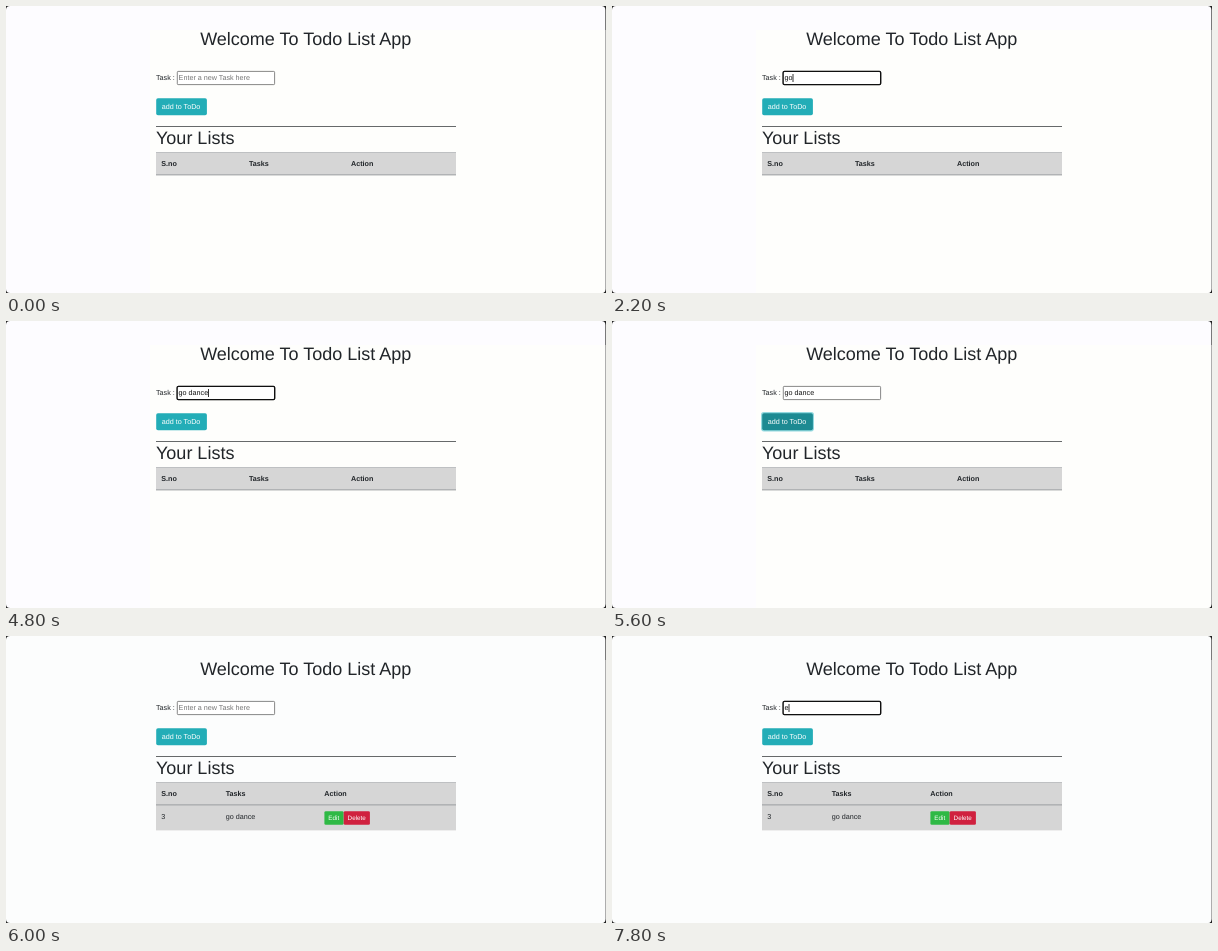
These frames come from a looping animation (600 by 287 pixels, 8 s). An HTML page:

```html
<!DOCTYPE html>
<html lang="en">
<head>
<meta charset="utf-8">
<title>Todo List</title>
<style>
  html, body { margin: 0; width: 100%; height: 100%; overflow: hidden; background: #222; }
  svg {
    display: block; width: 600px; height: 287px;
    font: 7.2px "Liberation Sans", Arial, sans-serif;
    text-rendering: geometricPrecision;
    --bg: #fefefc; --edge: #fdfcff; --ink: #212529; --rule: #55585a;
    --head: #d6d6d6; --top: #b9bcbe; --under: #94979a;
    --field: #fff; --line: #7b7b7b; --hint: #757575;
    --btn: #23adb7; --edit: #2fb945; --del: #d0213f;
    --label: #fff; --btnLine: none;
  }
  svg.listed { --bg: #fcfdfd; --edge: #fcfdfd; }
  svg.pressed { --btn: #1d8a92; }
  svg.dark {
    --bg: #181a1b; --edge: #181a1b; --ink: #e8e6e3; --rule: #6b665d;
    --head: #181a1b; --top: #5c574f; --under: #7d7460;
    --field: #181a1b; --line: #2c2b29; --hint: #8a8379;
    --btn: #181a1b; --edit: #181a1b; --del: #181a1b;
    --label: #e8e6e3; --btnLine: #71695c;
  }
  text { fill: var(--ink); white-space: pre; }
  .big { font-size: 18px; }
  .bold { font-weight: bold; }
  .label { fill: var(--label); }
  .small { font-size: 6.3px; }
  .btn { stroke: var(--btnLine); stroke-width: .8; }
  .hint { fill: var(--hint); }
  .typed { fill: #111; }
  #row, #focus, #ring, #bevel { visibility: hidden; }
  .listed #row, .focused #focus, .ringed #ring, .dark #bevel { visibility: visible; }
</style>
</head>
<body>
<svg id="app" viewBox="0 0 600 287">
  <rect width="600" height="287" fill="#222"/>
  <rect width="599.4" height="287" rx="4" style="fill:var(--edge)"/>
  <path d="M144 24H599.4V283a4 4 0 0 1-4 4H144z" style="fill:var(--bg)"/>

  <text class="big" x="299.7" y="38.8" text-anchor="middle">Welcome To Todo List App</text>

  <text x="150" y="74.4">Task :</text>
  <rect x="171.3" y="65.4" width="97.3" height="13.2" rx=".8" style="fill:var(--field);stroke:var(--line);stroke-width:.9"/>
  <path id="bevel" d="M171 78.5H268.5V65.5" fill="none" stroke="#8a7658"/>
  <rect id="focus" x="171.1" y="65.4" width="97.6" height="13.2" rx="1.4" fill="#fff" stroke="#101010" stroke-width="1.4"/>
  <text id="hint" class="hint" x="172.6" y="74.4">Enter a new Task here</text>
  <text id="typed" class="typed" x="172.6" y="74.4"></text>
  <rect id="caret" y="68" width=".8" height="8" fill="#000"/>

  <rect id="ring" x="149" y="91.1" width="53" height="19.3" rx="2.8" fill="#93d9df"/>
  <rect class="btn" x="150.2" y="92.3" width="50.7" height="17" rx="1.8" style="fill:var(--btn)"/>
  <text class="label" x="155.7" y="103">add to ToDo</text>

  <path d="M150 120.5H450" style="stroke:var(--rule);stroke-width:.9"/>
  <text class="big" x="150" y="138.2">Your Lists</text>

  <rect x="150" y="146" width="300" height="23" style="fill:var(--head)"/>
  <path d="M150 146.5H450" style="stroke:var(--top);stroke-width:.8"/>
  <g class="bold">
    <text x="155.3" y="159.9">S.no</text>
    <text id="tasks" y="159.9">Tasks</text>
    <text id="action" y="159.9">Action</text>
  </g>

  <g id="row">
    <rect x="150" y="169" width="300" height="25.4" style="fill:var(--head)"/>
    <text x="155.3" y="182.7">3</text>
    <text x="219.7" y="182.7">go dance</text>
    <rect class="btn" x="318.4" y="175.2" width="19.2" height="13.6" rx="1.4" style="fill:var(--edit)"/>
    <text class="label small" x="322.3" y="184.3">Edit</text>
    <rect class="btn" x="337.7" y="175.2" width="26.2" height="13.6" rx="1.4" style="fill:var(--del)"/>
    <text class="label small" x="341.6" y="184.3">Delete</text>
  </g>
  <path d="M150 168.9H450" style="stroke:var(--under);stroke-width:.9"/>
</svg>
<script>
  const LOOP = 8000;
  const el = id => document.getElementById(id);
  const app = el('app'), typed = el('typed'), caret = el('caret'), hint = el('hint');

  // [start, typed text, caret visible, state classes]
  const steps = [
    [0, '', 0, ''],
    [1000, '', 1, 'focused'],
    [1600, '', 0, 'focused'],
    [2000, 'g', 1, 'focused'],
    [2200, 'go', 1, 'focused'],
    [2600, 'go ', 1, 'focused'],
    [2800, 'go d', 1, 'focused'],
    [3200, 'go dan', 1, 'focused'],
    [3600, 'go danc', 1, 'focused'],
    [3800, 'go dance', 1, 'focused'],
    [4400, 'go dance', 0, 'focused'],
    [4800, 'go dance', 1, 'focused'],
    [5000, 'go dance', 1, 'focused pressed'],
    [5400, 'go dance', 0, 'pressed ringed'],
    [5800, '', 0, 'listed dark'],
    [6000, '', 0, 'listed'],
    [6800, '', 1, 'listed focused'],
    [7200, '', 0, 'listed focused'],
    [7600, '', 1, 'listed focused'],
    [7800, 'e', 1, 'listed focused']
  ];
  let shown;

  function show(step) {
    const [, text, blink, state] = step;
    const listed = state.includes('listed');
    app.setAttribute('class', state);
    typed.textContent = text;
    hint.style.visibility = text ? 'hidden' : 'visible';
    caret.style.visibility = blink ? 'visible' : 'hidden';
    caret.setAttribute('x', 172.6 + (text ? typed.getComputedTextLength() : 0));
    el('tasks').setAttribute('x', listed ? 219.7 : 243);
    el('action').setAttribute('x', listed ? 318.3 : 345);
  }

  function tick() {
    const t = performance.now() % LOOP;
    const step = steps.findLast(s => s[0] <= t);
    if (step !== shown) show(shown = step);
    requestAnimationFrame(tick);
  }
  tick();
</script>
</body>
</html>
```
